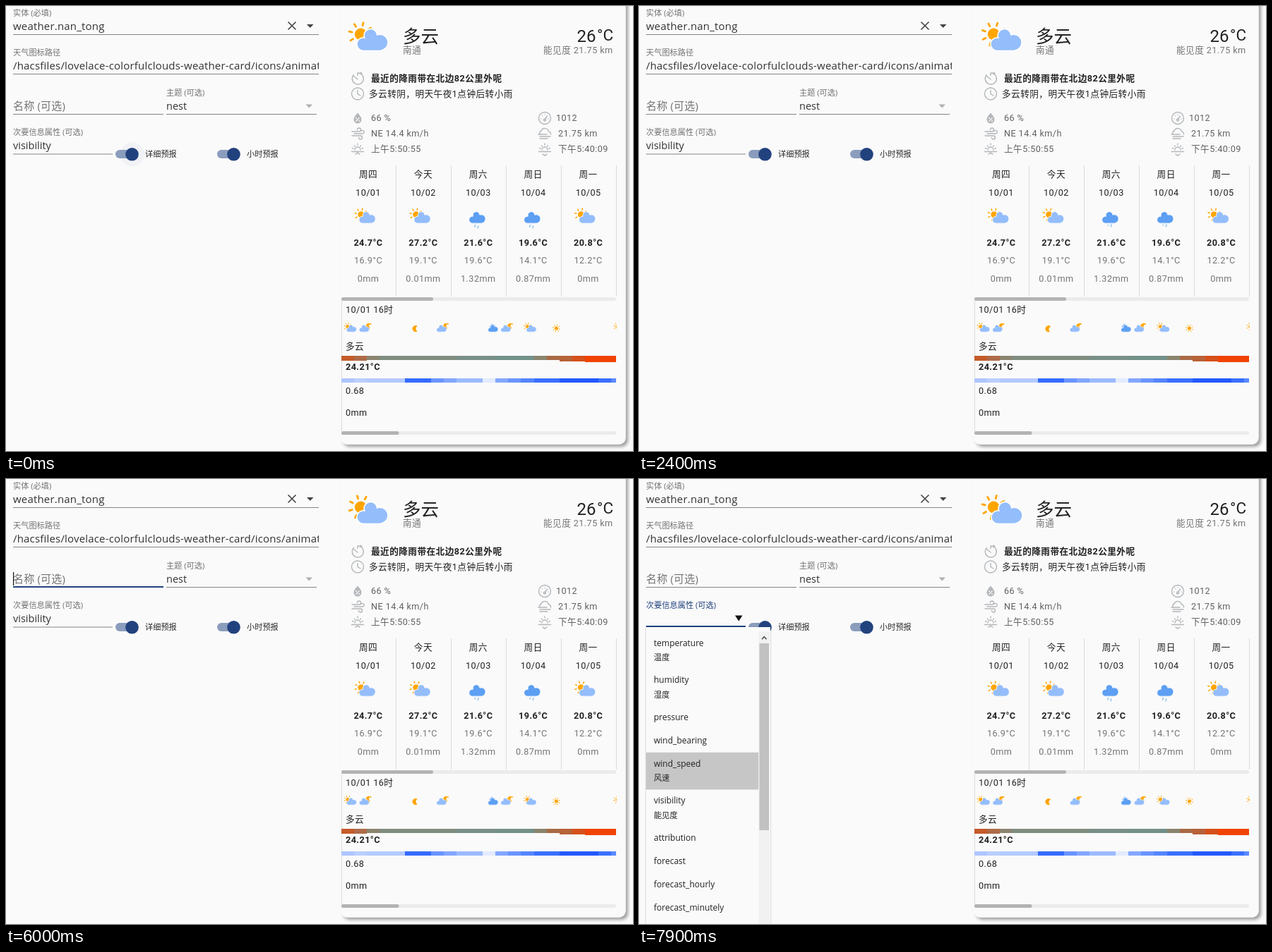
Write an HTML page that moves like this. It is 888x631 px and loops after 8 s.

```html
<!DOCTYPE html>
<html lang="zh-CN">
<head>
<meta charset="utf-8">
<title>Weather card editor</title>
<style>
  html, body { margin: 0; width: 100%; height: 100%; overflow: hidden; background: #fafafa; }
  svg { display: block; width: 888px; height: 631px; }
  text { white-space: pre; }
  .form { font: 15px "Open Sans", "Noto Sans CJK SC", "Noto Sans CJK", sans-serif; letter-spacing: .18px; fill: #333; }
  .plain { font-size: 14.5px; letter-spacing: 0; }
  .label { font-size: 11.2px; letter-spacing: 0; fill: #737373; }
  .dark { fill: #2a2a2a; }
  .item { font-size: 12px; letter-spacing: 0; fill: #212121; }
  .sub { font-size: 11.2px; letter-spacing: 0; fill: #212121; }
  .card { font: 12.7px Roboto, "Noto Sans CJK SC", "Noto Sans CJK", sans-serif; letter-spacing: .4px; fill: #212121; }
  .soft { fill: #616161; }
  .grey { fill: #757575; }
  .bold { font-weight: 700; }
  .mid { text-anchor: middle; }
  .title { font-size: 25.5px; letter-spacing: 0; }
  .degrees { font-size: 24px; letter-spacing: 0; }
  .unit { font-size: 22.5px; letter-spacing: 0; }
  .glyph { fill: none; stroke: #b4b7ba; stroke-width: 1.4; stroke-linecap: round; }
</style>
</head>
<body>
<svg id="stage" viewBox="0 0 888 631" xmlns="http://www.w3.org/2000/svg"></svg>
<script>
const LOOP = 8000, STEP = 100;
const BLUE = '#22427e', LINE = '#858585';
const LIGHT_CLOUD = '#94bdfb', RAIN_CLOUD = '#5c9ff3', SUN = '#ffa500';
const stage = document.getElementById('stage');

const text = (x, y, str, cls, extra = '') => `<text x="${x}" y="${y}" class="${cls}" ${extra}>${str}</text>`;
const rect = (x, y, w, h, fill, extra = '') => `<rect x="${x}" y="${y}" width="${w}" height="${h}" fill="${fill}" ${extra}/>`;
const at = (x, y, scale, body) => `<g transform="translate(${x} ${y}) scale(${scale})">${body}</g>`;
const glyph = (x, y, body) => `<g class="glyph" transform="translate(${x} ${y})">${body}</g>`;
const path = d => `<path d="${d}"/>`;

// Weather icons: the origin is the centre of the sun.
const sun = () => {
  let rays = '';
  for (let a = 0; a < 360; a += 45) rays += `<line y1="9" y2="12" transform="rotate(${a})"/>`;
  return `<g class="spin" stroke="${SUN}" stroke-width="2" stroke-linecap="round"><circle r="5" fill="${SUN}"/>${rays}</g>`;
};
const cloud = fill => `<path transform="translate(-20 -27)" fill="${fill}" stroke="#fff" stroke-width="1.2"
  d="M47.7 35.4c0-4.6-3.7-8.2-8.2-8.2-1 0-1.9.2-2.8.5-.3-3.4-3.1-6.2-6.6-6.2-3.7 0-6.7 3-6.7 6.7 0 .8.2 1.6.4 2.3
  -.3-.1-.7-.1-1-.1-3.7 0-6.7 3-6.7 6.7 0 3.6 2.9 6.6 6.5 6.7h17.2c4.4-.5 7.9-4 7.9-8.4z"/>`;
const drifting = fill => `<g class="drift">${cloud(fill)}</g>`;
const moon = () => `<path class="rock" fill="${SUN}" stroke="${SUN}" stroke-width="2"
  d="M2.5 0A10 10 0 0 1 7.5-8.7A10 10 0 1 0 7.5 8.7A10 10 0 0 1 2.5 0z"/>`;
const sunCloud = () => sun() + drifting(LIGHT_CLOUD);
const moonCloud = () => at(24, -2, .8, moon()) +
  `<circle cx="32" cy="-8" r="2.2" fill="${SUN}"/>` + drifting(LIGHT_CLOUD);
const rainCloud = () => cloud(RAIN_CLOUD) +
  `<g transform="translate(14 20) rotate(10)" stroke="#91c0f8" stroke-width="2" stroke-linecap="round" stroke-dasharray="4 7">
  <line class="drop" x1="-6" x2="-6" y1="1" y2="9"/><line class="drop" y1="-1" y2="7"/></g>`;
const overcast = () => `<g class="sway">${at(0, -6, .6, cloud(LIGHT_CLOUD))}</g>` + cloud(RAIN_CLOUD);

const toggle = (x, label) => rect(x, 204, 31, 12, '#8b9dbd', 'rx="6"') +
  `<circle cx="${x + 23.5}" cy="210.3" r="9.3" fill="${BLUE}"/>` + text(x + 42, 214, label, 'form label dark');

function editor() {
  const underline = (x, y, w) => rect(x, y, w, 1, LINE);
  return text(10, 13.8, '实体 (必填)', 'form label') +
    text(10, 33.5, 'weather.nan_tong', 'form') +
    `<path d="M399.5 22.5l11 11m0-11l-11 11" stroke="#444" stroke-width="1.6"/>
     <path d="M426 26h9.5l-4.75 5z" fill="#444"/>` +
    underline(10, 40, 433) +
    text(10, 70, '天气图标路径', 'form label') +
    `<g clip-path="url(#field)">${text(10, 90, '/hacsfiles/lovelace-colorfulclouds-weather-card/icons/animated/', 'form')}</g>` +
    underline(10, 96, 433) +
    underline(10, 153, 213) + rect(10, 152, 213, 2, BLUE, 'id="nameLine"') +
    text(0, 0, '名称 (可选)', 'form', 'id="nameLabel"') +
    text(10, 146.5, '', 'form', 'id="nameValue"') +
    rect(10, 132, 1.2, 19, '#111', 'id="caret"') +
    text(227, 126.5, '主题 (可选)', 'form label') + text(227, 146.5, 'nest', 'form plain') +
    '<path d="M424.5 139.5h9.5l-4.75 5z" fill="#b0b0b0"/>' + underline(227, 153, 213) +
    text(10, 183, '次要信息属性 (可选)', 'form label', 'id="infoLabel"') +
    text(10, 203, 'visibility', 'form plain', 'id="infoValue"') +
    rect(10, 209.5, 141, 1, LINE) +
    `<circle id="halo" cx="179" cy="210.3" fill="${BLUE}"/>` +
    toggle(155, '详细预报') + toggle(299, '小时预报');
}

const items = [['temperature', '温度'], ['humidity', '湿度'], ['pressure'], ['wind_bearing'], ['wind_speed', '风速'],
  ['visibility', '能见度'], ['attribution'], ['forecast'], ['forecast_hourly'], ['forecast_minutely']];

function menu() {
  let y = 216.5, rows = '';
  for (const [name, sub] of items) {
    const h = sub ? 52.7 : 32.9;
    rows += rect(10, y, 159.5, h, '#c6c6c6', `class="hover" data-name="${name}"`) +
      text(21, y + 20, name, 'form item') + (sub ? text(21, y + 40.3, sub, 'form sub') : '');
    y += h;
  }
  return `<g id="menu">
    <path d="M136 193.5h10.5l-5.25 8z" fill="#111"/>` + rect(10, 208, 141, 2, BLUE) +
    rect(10, 210, 176, 440, '#fafafa', 'filter="url(#lift)"') + rows +
    rect(169.5, 216.5, 15.5, 420, '#f1f1f1') + rect(170.5, 233, 13.5, 265, '#c1c1c1') +
    '<path d="M174 227.2l3.3-3.5 3.3 3.5" fill="none" stroke="#505050" stroke-width="1.6"/></g>';
}

// Bands are [right edge, colour] pairs laid from x to the right.
function band(x, y, h, stops) {
  let out = '';
  for (const [end, color] of stops) {
    out += rect(x, y, end - x, h, color, 'shape-rendering="crispEdges"');
    x = end;
  }
  return out;
}
const scrollbar = (y, thumb) => rect(475, y, 389, 5, '#ebebeb', 'rx="2.5"') + rect(475, y, thumb, 5, '#b3b3b3', 'rx="2.5"');

function details() {
  const sunArc = 'M-8.5 3.5h17M-4 1a4 4 0 0 1 8 0M-7.5-1.5l1.5.7M7.5-1.5l-1.5.7M-4.5-5l.8 1.2M4.5-5l-.8 1.2M0-8v2M-3 7.2';
  return glyph(498, 103, path('M-5.5-5.5A8 8 0 1 0 0-8v3.5M-5.5-3.5L0 1M4-9l2 1.5')) +
    glyph(498, 124.5, '<circle r="8.5"/>' + path('M0-5v5l4 2.5')) +
    '<path d="M498 151.5c3.5 4 5.5 6.5 5.5 9.5a5.5 5.5 0 0 1-11 0c0-3 2-5.5 5.5-9.5z" fill="#b4b7ba"/>' +
    '<path d="M495.5 163.5l5-5" stroke="#fafafa" stroke-width="1.2"/><circle cx="496" cy="159" r="1" fill="#fafafa"/><circle cx="500" cy="163" r="1" fill="#fafafa"/>' +
    glyph(498, 181, path('M-8-3h10a2.5 2.5 0 1 0-2.5-2.5M-5 0h12a2.3 2.3 0 1 0-2-3.5M-8 3h12a2.5 2.5 0 1 1-2.5 2.5')) +
    glyph(498, 203, path(sunArc + 'l3-2 3 2')) +
    glyph(763, 159, '<circle r="8.5"/>' + path('M0 2l3.5-5M-5 1v0M-3.5-3.5v0M0-5v0M5 1v0') + '<circle cy="2.5" r="1.5"/>') +
    glyph(763, 181, path('M-7 1a4 4 0 0 1 2-5a5.5 5.5 0 0 1 10.5 1a3.5 3.5 0 0 1 3 4M-9 1h12M-7 4h15M-7 7h11')) +
    glyph(763, 203, path(sunArc + 'l3 2 3-2')) +
    text(517, 106.5, '最近的降雨带在北边82公里外呢', 'card bold') +
    text(514, 129, '多云转阴，明天午夜1点钟后转小雨', 'card') +
    text(517, 163, '66 %', 'card soft') + text(517, 185, 'NE 14.4 km/h', 'card soft') + text(517, 207, '上午5:50:55', 'card soft') +
    text(779, 163, '1012', 'card soft') + text(782, 185, '21.75 km', 'card soft') + text(782, 207, '下午5:40:09', 'card soft');
}

const days = [['周四', '24.7', '16.9', '0'], ['今天', '27.2', '19.1', '0.01'], ['周六', '21.6', '19.6', '1.32'],
  ['周日', '19.6', '14.1', '0.87'], ['周一', '20.8', '12.2', '0']];

const daily = () => days.map(([day, high, low, rain], i) => {
  const x = 513 + 77.9 * i;
  const rainy = i === 2 || i === 3;
  return text(x, 243, day, 'card mid') + text(x, 269, `10/0${i + 1}`, 'card mid') +
    at(x - 10.2, 295.7, .74, rainy ? rainCloud() : sunCloud()) +
    text(x, 339.7, high + '°C', 'card bold mid') + text(x, 365, low + '°C', 'card grey mid') +
    text(x, 391, rain + 'mm', 'card grey mid') +
    rect(Math.round(552 + 77.9 * i), 226, 1, 186, '#dcdcdc');
}).join('');

function hourly() {
  const icons = [[484, sunCloud], [502, moonCloud], [611.5, moonCloud], [684.5, overcast], [702.5, moonCloud],
    [738.7, sunCloud]].map(([x, icon]) => at(x, 454.6, .45, icon())).join('');
  return rect(475, 418, 1, 188, '#dcdcdc') +
    text(481, 434.5, '10/01 16时', 'card') +
    `<g clip-path="url(#strip)">${icons}${at(579, 457.5, .42, moon())}${at(779.5, 457, .43, sun())}${at(866, 454.6, .45, sun())}</g>` +
    text(481, 487, '多云', 'card') +
    band(475, 496, 7, [[493, '#c45b2a'], [511, '#ae6b48']]) +
    band(511, 496, 6, [[529, '#8b8570'], [638, '#7f8d80'], [693, '#799087'], [748, '#739188'], [766, '#89846d'], [784, '#a96a45']]) +
    band(784, 496, 8, [[802, '#b86238'], [820, '#d5501a']]) + band(820, 496, 9, [[864, '#f04304']]) +
    text(481, 515.5, '24.21°C', 'card bold') +
    band(475, 528, 6, [[493, '#adc6ff'], [511, '#bacfff'], [565, '#b3caff'], [602, '#356bff'], [620, '#6a94ff'], [638, '#82a6ff'],
      [675, '#9cbaff'], [693, '#e3ebff'], [711, '#83a7ff'], [729, '#6a94ff'], [748, '#5585ff'], [784, '#3a70ff'],
      [839, '#2458ff'], [857, '#3b70ff'], [864, '#5a89ff']]) +
    text(481, 550, '0.68', 'card') + text(481, 581, '0mm', 'card');
}

const card = () => rect(474, -30, 403.5, 651.5, '#fafafa', 'rx="9" filter="url(#shadow)"') +
  at(502.3, 40, 1.4, sunCloud()) +
  text(562, 51.5, '多云', 'card title') +
  text(562, 67.3, '南通', 'card grey', 'id="place"') +
  text(808.5, 50.5, '26', 'card degrees') + text(837, 49, '°C', 'card unit') +
  text(761, 67.3, '能见度 21.75 km', 'card grey') +
  details() + daily() + scrollbar(413, 130) + hourly() + scrollbar(603, 81.5);

stage.innerHTML = `<defs>
  <clipPath id="field"><rect x="10" y="70" width="433" height="30"/></clipPath>
  <clipPath id="strip"><rect x="475" y="440" width="389.5" height="30"/></clipPath>
  <filter id="shadow" x="-5%" y="-5%" width="110%" height="110%"><feDropShadow dx="3.5" dy="3.5" stdDeviation="1.9" flood-opacity=".36"/></filter>
  <filter id="lift" x="-10%" y="-5%" width="120%" height="110%"><feDropShadow dx="0" dy="1" stdDeviation="1.2" flood-opacity=".3"/></filter>
  </defs>` + rect(0, 0, 888, 631, '#fafafa') + editor() + menu() + card();

const all = cls => [...stage.querySelectorAll('.' + cls)];
const [spins, drifts, rocks, sways, drops, hovers] = ['spin', 'drift', 'rock', 'sway', 'drop', 'hover'].map(all);
const el = id => document.getElementById(id);
const [nameLine, nameLabel, nameValue, caret, place, halo, infoLabel, infoValue, menuBox] =
  ['nameLine', 'nameLabel', 'nameValue', 'caret', 'place', 'halo', 'infoLabel', 'infoValue', 'menu'].map(el);

const clamp = v => Math.max(0, Math.min(1, v));
const ease = v => 1 - (1 - clamp(v)) ** 3;
const wave = (t, period) => 1 - Math.abs(2 * (t % period) / period - 1);
const show = (node, on) => node.setAttribute('visibility', on ? 'visible' : 'hidden');

const FOCUS = 2600, BLUR = 6300, OPEN = 6600;
const edits = [[FOCUS, ''], [3400, '5'], [3600, '55'], [3800, '555'], [4200, '555='],
  [5000, '555'], [5300, '55'], [5500, '5'], [5700, '']];

function drawIcons(t) {
  spins.forEach(n => n.setAttribute('transform', `rotate(${13 + t * .04})`));
  drifts.forEach(n => n.setAttribute('transform', `translate(${2 * wave(t, 3000)} 0)`));
  rocks.forEach(n => n.setAttribute('transform', `rotate(${15 * wave(t, 6000)})`));
  sways.forEach(n => n.setAttribute('transform', `translate(${3 - 4 * wave(t, 7000)} 0)`));
  drops.forEach((n, i) => n.setAttribute('stroke-dashoffset', -(t + 250 * (i % 2)) * .0125));
}

function drawName(t) {
  const focused = t >= FOCUS && t < BLUR;
  const [since, value] = edits.filter(e => e[0] <= t).pop() || edits[0];
  const up = ease((t - 3400) / 200) * (1 - ease((t - 5700) / 200));
  nameLabel.setAttribute('transform', `translate(10 ${146.5 - 20 * up}) scale(${1 - .253 * up})`);
  nameLabel.style.fill = focused && value ? BLUE : '#737373';
  nameValue.textContent = value;
  place.textContent = value || '南通';
  const grow = focused ? ease((t - FOCUS) / 200) : 0;
  nameLine.setAttribute('x', 10 + 106.5 * (1 - grow));
  nameLine.setAttribute('width', 213 * grow);
  caret.setAttribute('x', 10 + (value ? nameValue.getComputedTextLength() : 0));
  show(caret, focused && Math.floor((t - since) / 530) % 2 === 0);
}

function drawMenu(t) {
  const open = t >= OPEN;
  const hovered = !open || t < 6800 ? '' : t < 7500 ? 'wind_bearing' : 'wind_speed';
  menuBox.style.display = open ? '' : 'none';
  infoValue.style.display = open ? 'none' : '';
  infoLabel.style.fill = open ? BLUE : '#737373';
  hovers.forEach(n => { n.style.display = n.dataset.name === hovered ? '' : 'none'; });
}

function draw(t) {
  drawIcons(t);
  const grow = ease(t / 300);
  halo.setAttribute('r', 17 + 4 * grow);
  halo.setAttribute('opacity', (.04 + .06 * grow) * (1 - clamp((t - 1500) / 200)));
  drawName(t);
  drawMenu(t);
}

const start = performance.now();
function tick() {
  const t = (performance.now() - start) % LOOP;
  draw(Math.floor(t / STEP) * STEP);
  requestAnimationFrame(tick);
}
draw(0);
requestAnimationFrame(tick);
</script>
</body>
</html>
```
